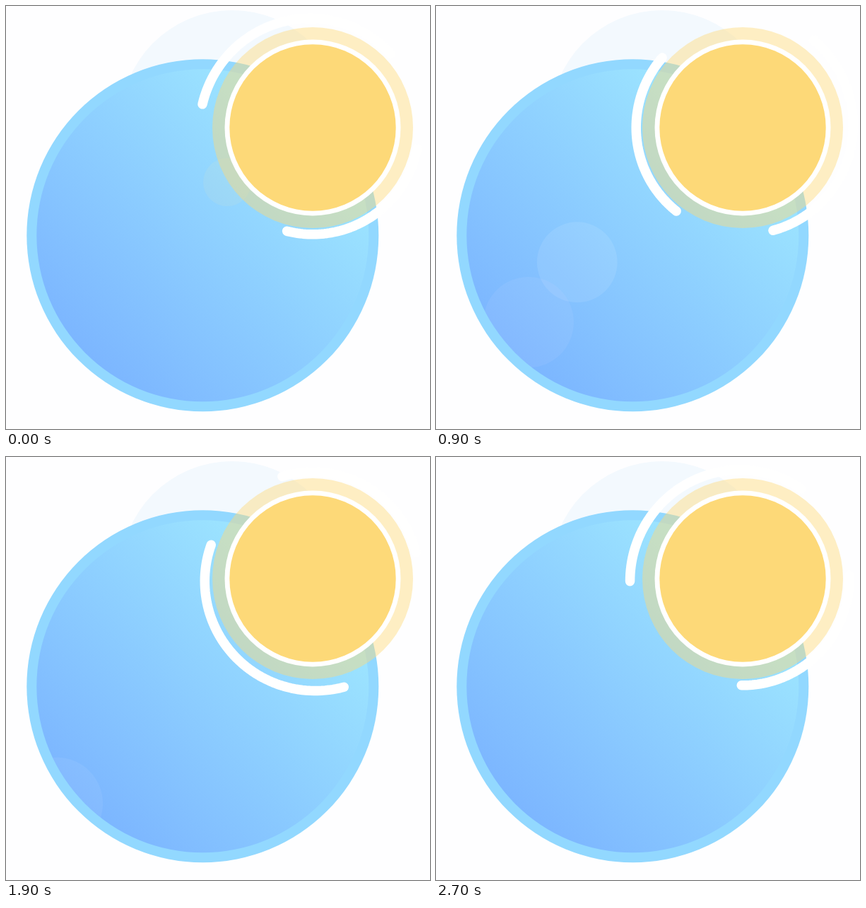
These frames come from a looping animation (600 px wide and 598 px high, 2.8 s). An HTML page with a canvas:

```html
<!DOCTYPE html>
<html lang="en">
<head>
<meta charset="utf-8">
<title>Sun and bubble</title>
<style>
  html, body { margin: 0; width: 100%; height: 100%; overflow: hidden; background: #fefeff; }
  canvas { display: block; }
</style>
</head>
<body>
<canvas id="stage" width="600" height="598"></canvas>
<script>
const ctx = document.getElementById('stage').getContext('2d');
const { sin, cos, min, max, PI } = Math;
const LOOP = 2800, STEP = 100;
const SUN = { x: 434, y: 172 };
const SEA = { x: 278.3, y: 324.3 };

const sea = ctx.createLinearGradient(112, 490, 444, 158);
sea.addColorStop(0, '#7cb6ff');
sea.addColorStop(1, '#9fe8ff');

function disc(x, y, r, fill) {
  ctx.beginPath();
  ctx.arc(x, y, r, 0, PI * 2);
  ctx.fillStyle = fill;
  ctx.fill();
}

// Arc around the sun, in degrees, whose radius runs from r0 to r1
function sweep(from, length, r0, r1) {
  ctx.beginPath();
  for (let k = 0; k <= 1; k += 1 / 64) {
    const angle = (from + length * k) * PI / 180;
    const r = r0 + (r1 - r0) * k;
    ctx.lineTo(SUN.x + r * cos(angle), SUN.y + r * sin(angle));
  }
  ctx.stroke();
}

// Degrees turned: steady, with a lull in mid-loop and a catch-up after it
function turned(u) {
  const a = 2 * PI * u;
  const sway = 9.9 * cos(a) - 8.4 * cos(2 * a) - 1.5
    - 1.7 * sin(a) - 1.2 * sin(2 * a) + 2.5 * sin(4 * a);
  return 360 * u + sway;
}

// Grows and cools while drifting from the sun to the lower left
function bubble(p) {
  const x = 313 - 355 * p + 10 * sin(9 * p);
  const r = 65 - 31 * (1 - 1.5 * p) ** 2;
  const warmth = max(0, 1 - 2.9 * p);
  const alpha = .09 * max(0, min(1, 6 * (.78 - p)));
  disc(x, 562 - x, r, `rgba(255,${255 - 25 * warmth},${255 - 95 * warmth},${alpha})`);
}

function draw(t) {
  const turn = turned(t / LOOP);
  ctx.fillStyle = '#fefeff';
  ctx.fillRect(0, 0, 600, 598);
  disc(320, 164, 158, '#f3f9fe');
  disc(SEA.x, SEA.y, 249, '#92d8ff');
  disc(SEA.x, SEA.y, 235, sea);

  ctx.save();
  ctx.clip();
  const glow = t < 1250 ? max(0, sin(PI * (t - 200) / 1050)) : 0;
  disc(131, 447, 64, `rgba(215,215,255,${.1 * glow})`);
  bubble(turn / 360);
  ctx.restore();

  disc(SUN.x, SUN.y, 142, 'rgba(253,217,119,.44)');

  ctx.strokeStyle = '#fff';
  ctx.lineWidth = 13.5;
  ctx.lineCap = ctx.lineJoin = 'round';
  sweep(turn + 11.5, 92.5, 150.8, 150.8);
  sweep(turn + 192, 124.5, 159.5, 151.5);

  disc(SUN.x, SUN.y, 124.5, '#fff');
  disc(SUN.x, SUN.y, 117.7, '#fdd978');
}

function tick() {
  const t = performance.now() % LOOP;
  draw(Math.floor(t / STEP) * STEP);
  requestAnimationFrame(tick);
}
tick();
</script>
</body>
</html>
```
